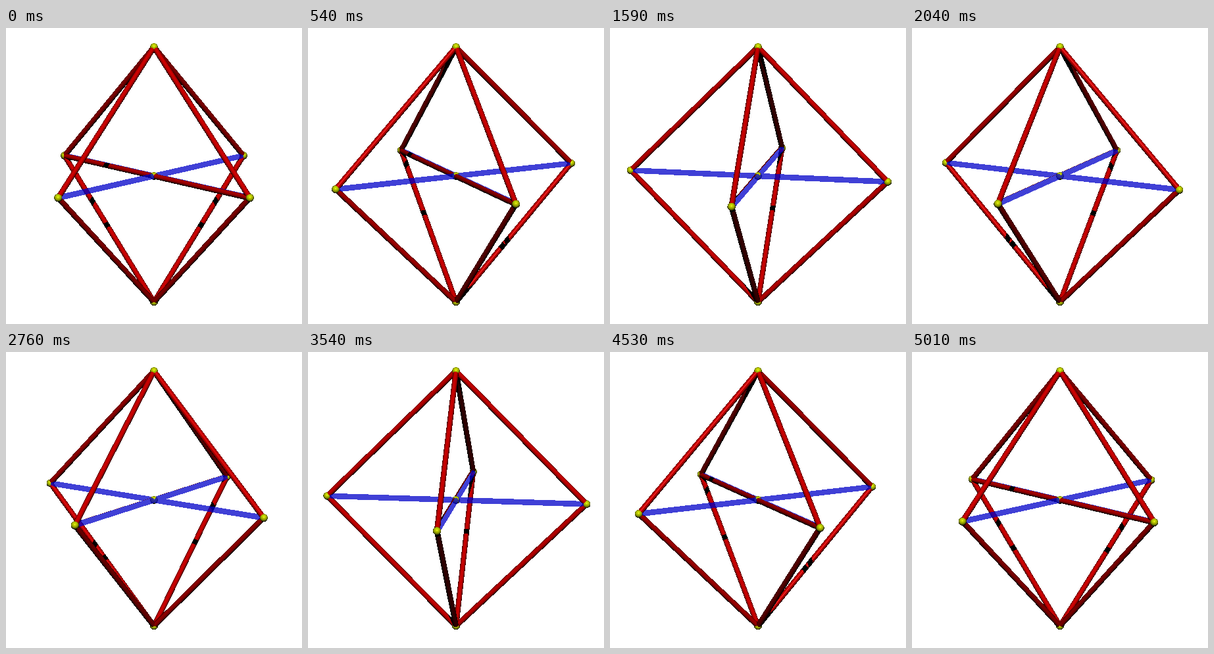
Recreate the animation shown at these times as an HTML page with a canvas. Size 450 by 450 pixels, loop 5040 ms.

```html
<!DOCTYPE html>
<html lang="en">
<head>
<meta charset="utf-8">
<title>Swinging octahedron</title>
<style>
  html, body { margin: 0; width: 100%; height: 100%; overflow: hidden; background: #fff; }
  canvas { display: block; width: 450px; height: 450px; }
</style>
</head>
<body>
<canvas id="stage" width="450" height="450"></canvas>
<script>
const SIZE = 450, MID = SIZE / 2;
const STEP = 30, STEPS = 168, HALF = STEPS / 2;
const EYE = 20, FOCAL = 199 * EYE;
const TILT = Math.asin(0.228);
const BALL = 0.03, ROD = 0.021, CORE = 0.0215, SHIFT = 0.004;
const RED = [204, 0, 0], YELLOW = [204, 220, 0], BLUE = [0, 0, 200];
const BLUE_ALPHA = 0.75;

const ctx = document.getElementById('stage').getContext('2d');
const image = ctx.createImageData(SIZE, SIZE);
const depth = new Float64Array(SIZE * SIZE);
const glass = new Float64Array(SIZE * SIZE);

const dot = (a, b) => a[0] * b[0] + a[1] * b[1] + a[2] * b[2];
const sub = (a, b) => [a[0] - b[0], a[1] - b[1], a[2] - b[2]];
const unit = a => { const l = Math.hypot(...a); return a.map(v => v / l); };

// World to camera space: x right, y up, z towards the eye.
function toCamera([x, y, z]) {
  const c = Math.cos(TILT), s = Math.sin(TILT);
  return [x, y * c - z * s, y * s + z * c];
}

function project(p) {
  const k = FOCAL / (EYE - p[2]);
  return [MID + p[0] * k, MID - p[1] * k];
}

const LIGHT = unit(toCamera([0, 0.66, 1]));
const HALFWAY = unit([LIGHT[0], LIGHT[1], LIGHT[2] + 1]);

function makeRod(p, q, r, color) {
  const v = sub(q, p), len = Math.hypot(...v);
  return { p, q, r, color, len, axis: unit(v) };
}

const makeBall = p => ({ p, q: p, r: BALL, color: YELLOW, axis: null });

// Distance along the ray to the near surface, or Infinity.
function hit(shape, ox, oy, oz, dx, dy, dz) {
  const { p, r, axis } = shape;
  const mx = ox - p[0], my = oy - p[1], mz = oz - p[2];
  let a = dx * dx + dy * dy + dz * dz;
  let b = mx * dx + my * dy + mz * dz;
  let c = mx * mx + my * my + mz * mz - r * r;
  let along = 0, slope = 0;
  if (axis) {
    along = mx * axis[0] + my * axis[1] + mz * axis[2];
    slope = dx * axis[0] + dy * axis[1] + dz * axis[2];
    a -= slope * slope;
    b -= along * slope;
    c -= along * along;
  }
  const disc = b * b - a * c;
  if (disc < 0) return Infinity;
  const t = (-b - Math.sqrt(disc)) / a;
  if (t < 1e-3) return Infinity;
  if (axis) {
    const s = along + t * slope;
    if (s < 0 || s > shape.len) return Infinity;
  }
  return t;
}

function eachPixel(shape, visit) {
  const [x0, y0] = project(shape.p), [x1, y1] = project(shape.q);
  const pad = shape.r * 215 + 1;
  const vx = x1 - x0, vy = y1 - y0, vv = vx * vx + vy * vy || 1;
  const bottom = Math.ceil(Math.max(y0, y1) + pad);
  const right = Math.ceil(Math.max(x0, x1) + pad);
  for (let y = Math.floor(Math.min(y0, y1) - pad); y <= bottom; y++) {
    for (let x = Math.floor(Math.min(x0, x1) - pad); x <= right; x++) {
      const ux = x + 0.5 - x0, uy = y + 0.5 - y0;
      const k = Math.max(0, Math.min(1, (ux * vx + uy * vy) / vv));
      const ex = ux - k * vx, ey = uy - k * vy;
      if (ex * ex + ey * ey > pad * pad) continue;
      const dx = (x + 0.5 - MID) / FOCAL, dy = (MID - y - 0.5) / FOCAL;
      const t = hit(shape, 0, 0, EYE, dx, dy, -1);
      if (t < Infinity) visit(y * SIZE + x, t, dx, dy);
    }
  }
}

function inShadow(shape, pt, casters) {
  for (const other of casters) {
    if (other === shape || other === shape.twin) continue;
    if (hit(other, pt[0], pt[1], pt[2], LIGHT[0], LIGHT[1], LIGHT[2]) < Infinity) return true;
  }
  return false;
}

function shade(shape, t, dx, dy, casters) {
  const pt = [dx * t, dy * t, EYE - t];
  let n = sub(pt, shape.p);
  if (shape.axis) {
    const s = dot(n, shape.axis);
    n = n.map((v, i) => v - s * shape.axis[i]);
  }
  n = n.map(v => v / shape.r);
  const lit = dot(n, LIGHT);
  if (lit <= 0 || inShadow(shape, pt, casters)) return [0, 0, 0];
  const shine = 60 * Math.pow(Math.max(0, dot(n, HALFWAY)), 150);
  return shape.color.map(v => v * lit + shine);
}

function buildScene(angle) {
  const at = deg => {
    const a = deg * Math.PI / 180;
    return [Math.sin(a), 0, Math.cos(a)];
  };
  const ring = [0, 90, 180, 270].map(d => toCamera(at(angle + d)));
  const top = toCamera([0, 1, 0]), bottom = toCamera([0, -1, 0]);

  const balls = [top, bottom, [0, 0, 0], ...ring].map(makeBall);
  const edges = ring.flatMap(v => [top, bottom].map(end => makeRod(v, end, ROD, RED)));
  const cores = [0, 1].map(i => makeRod(ring[i], ring[i + 2], CORE, BLUE));

  // A red rod lies beside the first blue one, a hair to its left.
  const side = ring[3].map(v => v * SHIFT);
  const move = p => p.map((v, i) => v + side[i]);
  const red = makeRod(move(ring[0]), move(ring[2]), ROD, RED);
  red.twin = cores[0];

  return { solids: [...balls, ...edges, red], cores };
}

function draw(angle) {
  const { solids, cores } = buildScene(angle);
  const casters = [...solids, ...cores];
  const px = image.data;
  const owner = new Array(SIZE * SIZE);
  px.fill(255);
  depth.fill(Infinity);
  glass.fill(Infinity);

  for (const shape of solids) {
    eachPixel(shape, (i, t, dx, dy) => {
      if (t >= depth[i]) return;
      if (shape.twin && hit(shape.twin, 0, 0, EYE, dx, dy, -1) < t) return;
      depth[i] = t;
      owner[i] = shape;
    });
  }

  owner.forEach((shape, i) => {
    const x = i % SIZE, y = (i - x) / SIZE;
    const dx = (x + 0.5 - MID) / FOCAL, dy = (MID - y - 0.5) / FOCAL;
    const rgb = shade(shape, depth[i], dx, dy, casters);
    for (let c = 0; c < 3; c++) px[i * 4 + c] = rgb[c];
  });

  for (const core of cores) {
    eachPixel(core, (i, t) => {
      if (t >= depth[i] || glass[i] < Infinity) return;
      glass[i] = t;
      for (let c = 0; c < 3; c++) {
        px[i * 4 + c] = px[i * 4 + c] * (1 - BLUE_ALPHA) + BLUE[c] * BLUE_ALPHA;
      }
    });
  }
  ctx.putImageData(image, 0, 0);
}

// Steady swing to one side and back.
const angleAt = step => 45 - (HALF - Math.abs(HALF - step)) * 90 / 85;

let shown = -1;
const start = performance.now();
function tick() {
  const step = Math.floor((performance.now() - start) / STEP) % STEPS;
  if (step !== shown) {
    shown = step;
    draw(angleAt(step));
  }
  requestAnimationFrame(tick);
}
tick();
</script>
</body>
</html>
```
